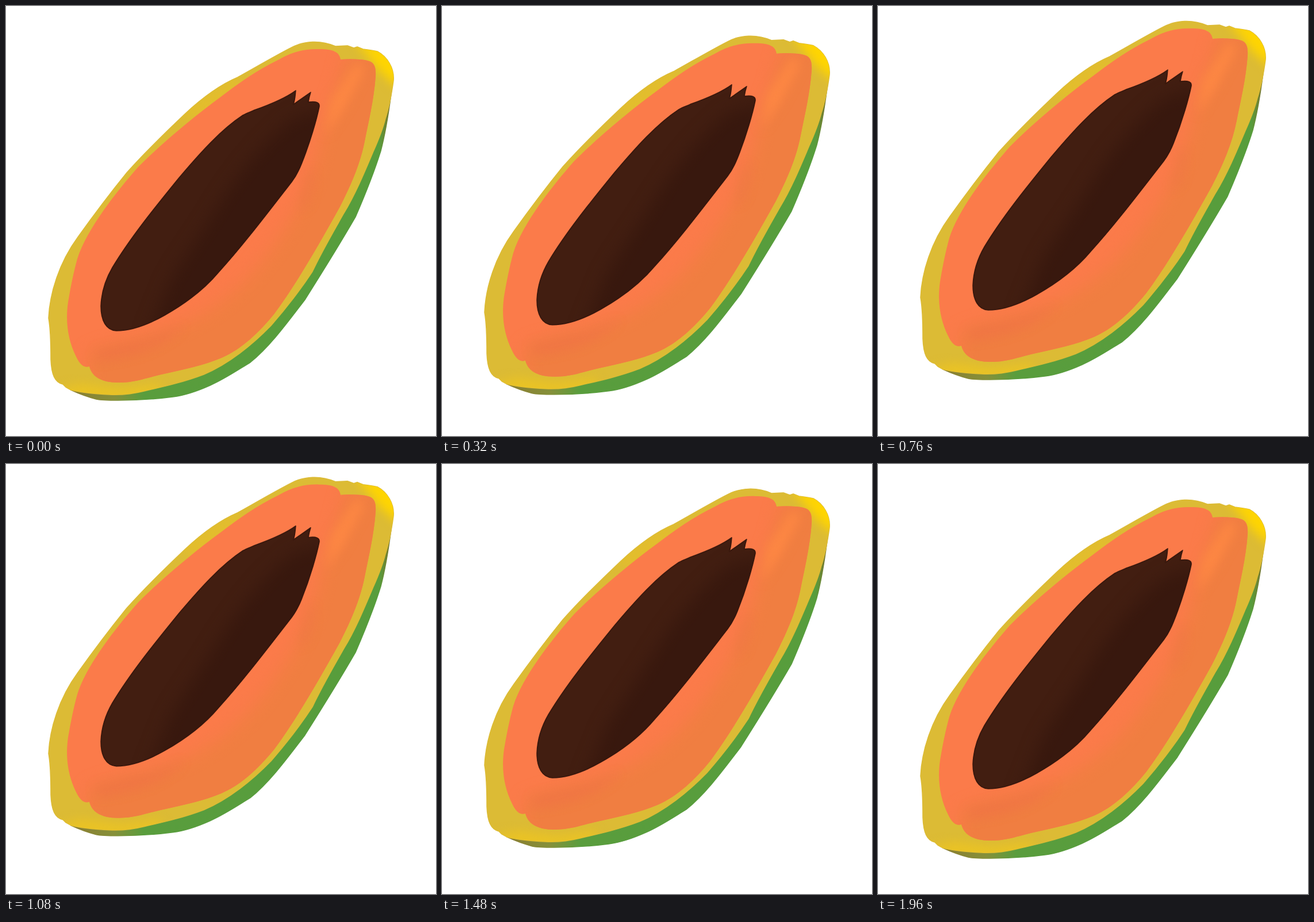
An HTML page for the animation above (2 s loop, 748 px wide and 748 px high).

```html
<!DOCTYPE html>
<html lang="en">
<head>
<meta charset="utf-8">
<title>Floating papaya</title>
<style>
  html, body { margin: 0; width: 100%; height: 100%; overflow: hidden; background: #fff; }
  svg { display: block; width: 100%; height: 100%; }
  filter { color-interpolation-filters: sRGB; }
</style>
</head>
<body>
<svg viewBox="0 0 748 748">
  <defs>
    <linearGradient id="rind" gradientUnits="userSpaceOnUse" x1="110" y1="0" x2="675" y2="0">
      <stop offset="0" stop-color="#8b7d30"/>
      <stop offset=".14" stop-color="#85903a"/>
      <stop offset=".23" stop-color="#599d3d"/>
      <stop offset=".955" stop-color="#579d3c"/>
      <stop offset=".985" stop-color="#77782f"/>
    </linearGradient>
    <filter id="soft" x="-50%" y="-50%" width="200%" height="200%"><feGaussianBlur stdDeviation="9"/></filter>
    <filter id="softer" x="-50%" y="-50%" width="200%" height="200%"><feGaussianBlur stdDeviation="14"/></filter>
    <path id="skin" d="M74 543C76 500 92 447 125 402C150 367 180 327 210 290C235 262 275 222 312 187C340 161 370 138 403 124C432 108 464 89 495 73C518 60 548 59 573 70L594 69L605 73L611 71L621 75C630 76 638 77 646 79C663 88 676 108 674 130C671 152 667 175 660 196C655 216 647 235 639 253C623 291 607 329 588 360C570 392 550 426 533 462C512 494 488 525 461 556C429 589 387 623 344 641C310 654 275 662 240 670C220 675 200 677 180 676C158 675 133 673 113 668L104 663L99 658C85 655 79 641 78 615C78 590 78 565 74 543Z"/>
    <path id="flesh" d="M582 93C580 80 569 75 545 75C520 74 498 80 475 93C436 112 405 134 375 157C326 193 272 238 230 280C192 323 140 389 124 440C117 465 112 492 108 515C103 550 108 582 122 610C129 625 137 630 145 627C149 643 163 655 196 655C225 655 243 647 270 641C310 632 345 625 375 612C410 597 441 567 467 535C504 485 541 421 581 349C603 306 617 271 624 235C630 204 640 164 643 122C644 99 638 95 615 93C603 92 592 92 582 93Z"/>
    <path id="hollow" d="M504 147C503 156 503 163 500 171L530 150C528 156 527 161 526 167C540 165 546 168 545 175C541 195 530 235 514 275C508 290 503 298 497 306C452 364 411 418 370 463C344 494 308 520 276 538C246 555 217 565 192 565C174 564 165 547 165 522C166 495 174 474 185 455C215 405 256 354 300 300C338 255 374 215 412 190C419 186 426 184 432 181C460 171 485 161 504 147Z"/>
    <clipPath id="inSkin"><use href="#skin"/></clipPath>
    <clipPath id="inFlesh"><use href="#flesh"/></clipPath>
    <clipPath id="inHollow"><use href="#hollow"/></clipPath>
  </defs>
  <g id="fruit" stroke-linejoin="round">
    <path fill="url(#rind)" stroke="url(#rind)" stroke-width="1.5" d="M671 145C667 175 663 210 652 252C640 291 624 330 608 367C582 412 551 462 520 511C493 546 460 592 425 620C402 634 380 649 355 660C335 669 314 677 290 680C260 684 228 686 195 686C181 686 167 686 157 684C142 680 126 674 113 668L300 600L600 300Z"/>
    <use href="#skin" fill="#dcbb35" stroke="#dcbb35" stroke-width="1.5"/>
    <g clip-path="url(#inSkin)">
      <path d="M612 64L655 70L692 100L682 140L652 112L634 88Z" fill="#ffd500" stroke="#ffd500" stroke-width="4" filter="url(#soft)"/>
      <path d="M90 668L130 657L200 666L270 658L270 690L100 690Z" fill="#eac324" filter="url(#soft)"/>
      <path d="M300 190L400 122L410 133L330 195Z" fill="#e5be2a" filter="url(#soft)"/>
    </g>
    <use href="#flesh" fill="#fb7b4a"/>
    <g clip-path="url(#inFlesh)">
      <path d="M592 85L575 150L552 215L528 310C500 370 462 425 425 468C375 520 320 555 250 575C210 585 170 592 145 605L140 690L400 690L700 350L700 80Z" fill="#f07e41" filter="url(#softer)"/>
      <path d="M610 98L624 110L588 178L555 225L565 165Z" fill="#fd8743" filter="url(#soft)"/>
      <path d="M527 285L538 290L526 345L508 358Z" fill="#ec7843" opacity=".7" filter="url(#soft)"/>
      <path d="M155 600C200 585 260 580 310 555C270 600 210 612 160 618Z" fill="#ef7444" opacity=".8" filter="url(#soft)"/>
    </g>
    <use href="#hollow" fill="#421e11" stroke="#3d1a0f" stroke-width="1.5"/>
    <g clip-path="url(#inHollow)">
      <path d="M560 180L500 195C450 235 405 290 368 350C345 390 310 435 285 480L245 580L400 560L580 320Z" fill="#38180e" filter="url(#softer)"/>
      <use href="#hollow" fill="none" stroke="#2c1009" stroke-width="3" opacity=".25"/>
    </g>
  </g>
</svg>
<script>
  const fruit = document.getElementById('fruit');
  const LOOP = 2000, STEP = 40, CYCLE = 49, LEAD = 0.2, RISE = 20.25;
  const start = performance.now();

  function draw() {
    const time = (performance.now() - start) % LOOP;
    const step = Math.floor(time / STEP) + LEAD;
    const y = -RISE * (1 - Math.cos(2 * Math.PI * step / CYCLE));
    fruit.setAttribute('transform', `translate(0 ${y.toFixed(2)})`);
    requestAnimationFrame(draw);
  }
  draw();
</script>
</body>
</html>
```
